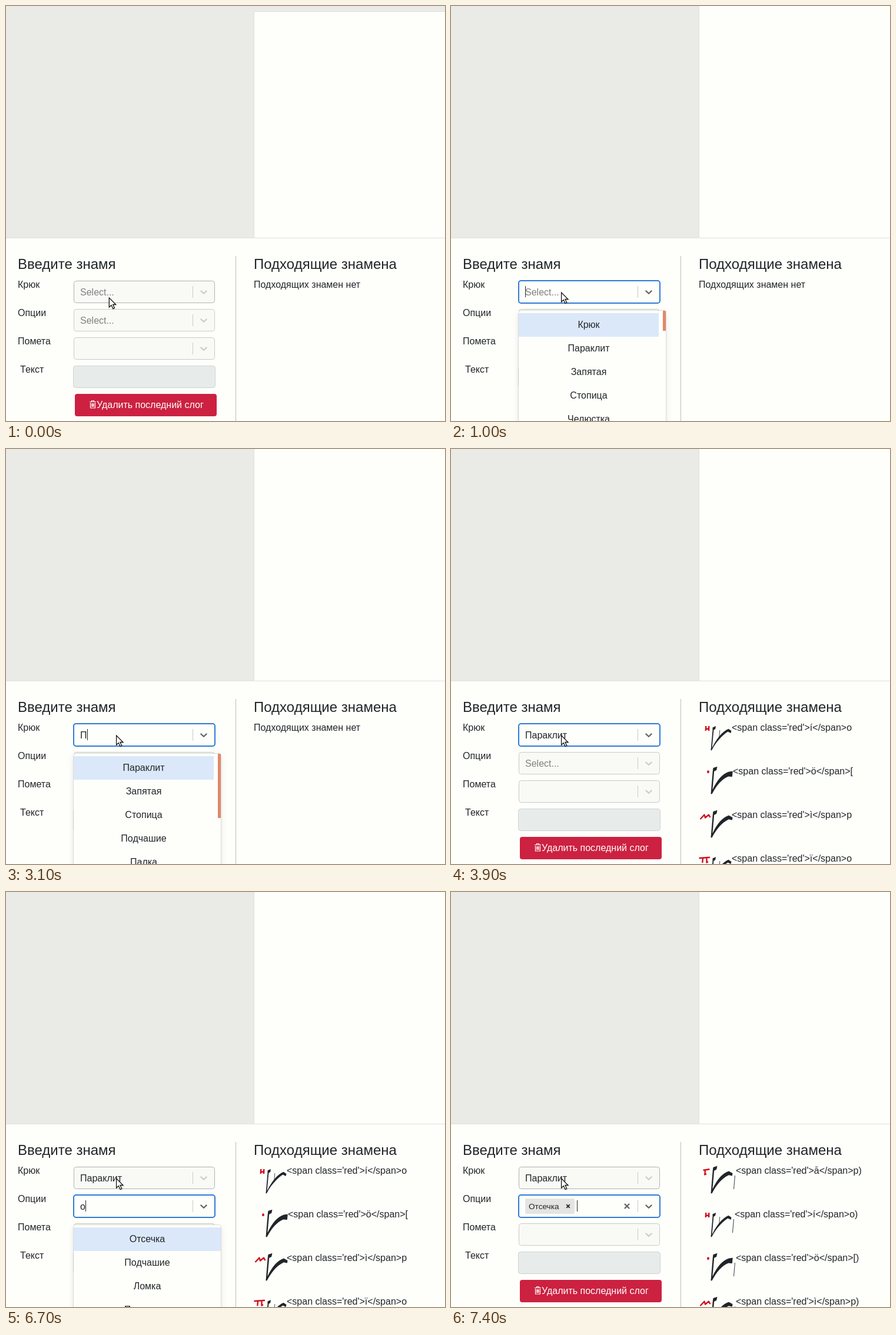
Animation, 746 px wide and 704 px high, one loop 8 s. Source, as an HTML page:

```html
<!DOCTYPE html>
<html lang="ru">
<head>
<meta charset="utf-8">
<style>
  html, body { margin: 0; width: 100%; height: 100%; overflow: hidden; background: #fefffb; }
  svg { display: block; }
  text { font: 16px "Liberation Sans", Arial, sans-serif; fill: #212529; white-space: pre; }
  .title { font-size: 24px; }
  .hint { fill: #808080; }
  .chip { font-size: 13.6px; }
  .button { fill: #fefffb; }
  .red { fill: none; stroke: #d00e1c; stroke-width: 2.4; stroke-linejoin: round; }
  .menu { fill: #fefffb; filter: drop-shadow(0 4px 5px rgba(0, 0, 0, .1)); stroke: rgba(0, 0, 0, .12); }
</style>
</head>
<body>
<svg id="stage" width="746" height="704" viewBox="0 0 746 704"></svg>
<script>
const stage = document.getElementById('stage');
const LOOP = 8000, PAPER = '#fefffb', INK = '#212529';

const escape = s => s.replace(/&/g, '&amp;').replace(/</g, '&lt;').replace(/>/g, '&gt;');
const text = (x, y, s, cls = '', anchor = 'start') =>
  `<text x="${x}" y="${y}" class="${cls}" text-anchor="${anchor}">${escape(s)}</text>`;
const rect = (x, y, w, h, fill, extra = '') =>
  `<rect x="${x}" y="${y}" width="${w}" height="${h}" fill="${fill}" ${extra}/>`;
const line = (d, color, width = 1, extra = '') =>
  `<path d="${d}" fill="none" stroke="${color}" stroke-width="${width}" ${extra}/>`;
const at = (x, y, body) => `<g transform="translate(${x} ${y})">${body}</g>`;
const caret = (x, y) => rect(x, y, 1, 19, INK);
const cross = (x, y, r, color, width) =>
  line(`M${x - r} ${y - r}l${2 * r} ${2 * r}m0 ${-2 * r}l${-2 * r} ${2 * r}`, color, width);

function select(y, { value = '', hint = false, focus = false, hover = false, chevron = 204 }) {
  const frame = focus
    ? rect(115, y, 240, 38, PAPER, 'rx="4" stroke="#2f7bd5" stroke-width="2"')
    : rect(115.5, y + .5, 239, 37, '#f9faf6', `rx="4" stroke="${hover ? '#b0b2af' : '#c9cbc8'}"`);
  return frame
    + rect(317, y + 9, 1, 20, '#c9cbc8')
    + line(`M331.3 ${y + 17.4}l4.7 4.4l4.7 -4.4`, `rgb(${chevron},${chevron},${chevron})`, 2.2, 'stroke-linecap="round"')
    + text(126, y + 25, value, hint ? 'hint' : '');
}

function menu(y, items, thumb) {
  const width = thumb ? 238 : 250;
  return rect(114.5, y - .5, 251, 300, PAPER, 'class="menu" rx="4"')
    + rect(115, y + 4, width, 40, '#dbe8fa')
    + items.map((s, i) => text(115 + width / 2, y + 29 + 40 * i, s, '', 'middle')).join('')
    + (thumb ? rect(360, y, 5, thumb, '#e28769') : '');
}

// Red marks, keyed by the letter that encodes them
const marks = {
  'í': '<path class="red" d="M433.3 470l-.5 8M438.3 470l-.2 8M433 473.5q3 3 5 0"/>',
  'ö': '<ellipse cx="437" cy="473.7" rx="2" ry="2.4" fill="#d00e1c"/>',
  'ì': '<path class="red" d="M423.5 480L430.5 472.5L432 477.5L438 472.5L440.5 477"/>',
  'ï': '<path class="red" d="M421.5 472L440 470.7M428 472L427.3 480M434.5 472V479.5L437 478"/>',
  'ā': '<path class="red" d="M428.5 472L439.5 470.3M432 471.5L431.3 479.5L434 478"/>'
};

function neume(kind) {
  if (kind === 'o') return `<g fill="${INK}"><path d="M444.5 472.5l5.5 -2.5l-.8 5l-2.8 1.8L443.6 507
    C451 492 461 479 471.5 474.8L476.5 478L475.5 482L470.5 479.5C460 486 449 499 443 511.3H441.5L444.5 477Z"/></g>`
    + line('M456.8 477l-1.3 15', INK, .8);
  const tip = kind === 'p' ? 'L478.5 625l-.6 4.5l-6 -1.2' : 'L478.8 620.5l-1 9.5l-6.5 -.6';
  return `<path transform="translate(0 -148)" fill="${INK}" d="M445.5 615l7 -2.3l-1.3 6l-4 2L444.4 652
    C452 636 461 625 472 621.5${tip}C460 634 451 645 443.5 659.3H441.5L444.7 621Z"/>`;
}

function results(rows) {
  return rows.map(([mark, kind, x, slash], i) => at(0, 74 * i,
    marks[mark] + neume(kind)
    + (slash ? line(`M${x - 1.5} 481l-2 23`, INK, .9) : '')
    + text(x, 478, `<span class='red'>${mark}</span>${kind}${slash ? ')' : ''}`))).join('');
}

const trash = line('M142 671.5H153M145.5 671V669.5H149.5V671M143.5 673V682H151.5V673M145.8 674V680M147.5 674V680M149.2 674V680',
  PAPER, 1.2);

const cursor = (x, y) => at(x, y,
  '<path d="M.6 .6V16.4L4.3 13L7.2 19.2L9.8 18L7 12H12Z" fill="#fff" stroke="#111" stroke-width="1.3"/>');

function page(scrolled) {
  const top = scrolled ? -2 : 9.5;
  return rect(0, 0, 746, 704, PAPER)
    + rect(0, 0, 746, 393, '#eaebe7')
    + rect(421.5, top, 330, 393.5 - top, PAPER, 'stroke="#dfe1dd"')
    + rect(0, 393, 746, 311, PAPER)
    + rect(0, 393, 746, 1, '#dfe1dd')
    + rect(390, 424, 1, 280, '#bdbfbb')
    + text(20, 446, 'Введите знамя', 'title')
    + text(421, 446, 'Подходящие знамена', 'title')
    + text(20, 478, 'Крюк') + text(20, 526, 'Опции')
    + text(20, 574, 'Помета') + text(24, 622, 'Текст')
    + rect(114.5, 610.5, 241, 37, '#e7ebea', 'rx="4" stroke="#ccd2d4"')
    + rect(117, 658, 241, 38, '#cc2141', 'rx="4"')
    + trash + text(154, 682, 'Удалить последний слог', 'button');
}

function scene(t) {
  const opened = t >= 1000, typed = t >= 1900, chosen = t >= 3900;
  const second = t >= 4400, searching = t >= 6700 && t < 7400, tagged = t >= 7400;
  const fade = Math.min(1, Math.max(0, (t - 4300) / 200));

  const first = select(466, {
    value: chosen ? 'Параклит' : typed ? 'П' : 'Select...',
    hint: !typed, focus: opened && !second, hover: true,
    chevron: !opened ? 204 : second ? 102 + 102 * fade : 102
  });
  const options = select(514, {
    value: tagged ? '' : searching ? 'о' : 'Select...',
    hint: !searching, focus: second, chevron: second ? 204 - 102 * fade : 204
  });

  let s = page(opened) + first + options + select(562, {});

  if (tagged) s += results([['ā', 'p', 484, 1], ['í', 'o', 482, 1], ['ö', '[', 484, 1], ['ì', 'p', 484, 1]]);
  else if (chosen) s += results([['í', 'o', 477], ['ö', '[', 479], ['ì', 'p', 477], ['ï', 'o', 477]]);
  else s += text(421, 478, 'Подходящих знамен нет');

  if (opened && !typed) s += caret(126, 475)
    + menu(517, ['Крюк', 'Параклит', 'Запятая', 'Стопица', 'Челюстка'], 34);
  if (typed && !chosen) s += (t >= 3100 ? caret(138, 475) : '')
    + menu(517, ['Параклит', 'Запятая', 'Стопица', 'Подчашие', 'Палка'], 109);
  if (t >= 4600 && t < 5600) s += caret(126, 523);
  if (searching) s += caret(135, 523)
    + menu(565, ['Отсечка', 'Подчашие', 'Ломка', 'Подвертка']);
  if (tagged) s += rect(126, 520, 84, 26, '#e4e5e2', 'rx="2"')
    + text(132, 538, 'Отсечка', 'chip') + cross(199, 533, 2.8, INK, 1.8)
    + caret(214, 523) + cross(299, 533, 4, '#666', 2.4);

  return s + (t < 300 ? cursor(174.7, 494.5) : t < 400 ? cursor(181, 490) : cursor(187, 485.5));
}

let shown = '';
function draw(now) {
  const t = Math.floor(now % LOOP / 100) * 100;
  const next = scene(t);
  if (next !== shown) stage.innerHTML = shown = next;
  requestAnimationFrame(draw);
}
draw(performance.now());
</script>
</body>
</html>
```
